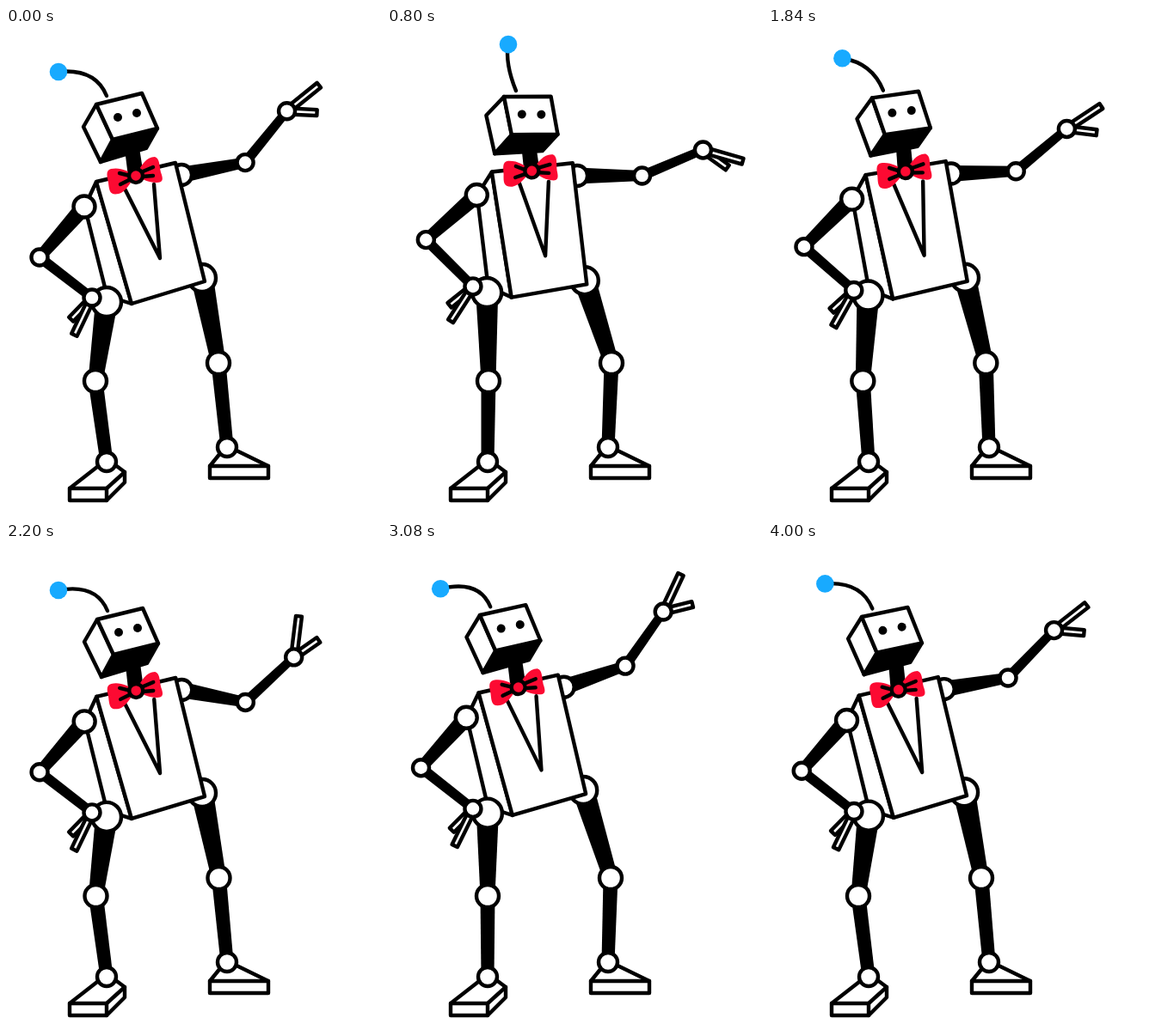
Animation of 436 by 567 pixels, one loop 4.04 s. Source, as an HTML page with a canvas:

```html
<!DOCTYPE html>
<html>
<head>
<meta charset="utf-8">
<title>Dancing robot</title>
<style>
html, body { margin: 0; width: 100%; height: 100%; overflow: hidden; background: #fff; }
canvas { display: block; }
</style>
</head>
<body>
<canvas id="stage" width="436" height="567"></canvas>
<script>
const ctx = document.getElementById('stage').getContext('2d');
const LOOP = 4040, BAR = 2020, STEP = 40;
const RED = '#fc0a32', BLUE = '#18aaff';
const rad = deg => deg * Math.PI / 180;

// time, lean, body y, head x, y, turn, antenna dx, dy, knee x, upper arm, forearm, hand, finger spread
const KEYS = [
  [0, 0, 308, 105, 89, 0, -56, -28, 104, -11, -51, -39, 42],
  [180, .1, 308, 106, 89, 0, -57, -24, 104.5, 11, -43, -83, 48],
  [380, -5.5, 311, 89, 98, -3, -57, -22, 97, -25, -55, -62, 50],
  [580, 3.6, 311, 113, 93, .5, -51, -18, 111, 3, -26, -46, 62],
  [800, 7.2, 306, 136, 80, 13.5, -9, -54, 118, 0, -23, 16, 20],
  [1060, .7, 304.5, 108, 84, 1.2, -58, -21, 117, -19, -55, -65, 51],
  [1480, 2.2, 304.5, 116, 82, 4.5, -54, -31, 113, 26, -56, -31, 33],
  [1810, 4, 305, 122, 81, 6, -47, -38, 111, 0, -40, -33, 40],
  [1980, .3, 307, 109, 86, 2, -55, -29, 105, -10, -46, -38, 43]
];

function key(i) {
  const n = KEYS.length, k = KEYS[(i + n) % n];
  return [k[0] + BAR * Math.floor(i / n), ...k.slice(1)];
}

// Smooth cubic through the keys, repeating every bar
function poseAt(t) {
  let i = KEYS.length - 1;
  while (KEYS[i][0] > t) i--;
  const [a, b, c, d] = [key(i - 1), key(i), key(i + 1), key(i + 2)];
  const span = c[0] - b[0], u = (t - b[0]) / span, v = 1 - u;
  return b.slice(1).map((p, j) => {
    const q = c[j + 1];
    const m = (q - a[j + 1]) / (c[0] - a[0]) * span;
    const n = (d[j + 1] - p) / (d[0] - b[0]) * span;
    return p * (1 + 2 * u) * v * v + m * u * v * v + q * u * u * (3 - 2 * u) - n * u * u * v;
  });
}

function poly(points, fill = '#fff') {
  ctx.beginPath();
  points.forEach(p => ctx.lineTo(...p));
  ctx.closePath();
  ctx.fillStyle = fill;
  ctx.fill();
  ctx.stroke();
}

function line(...points) {
  ctx.beginPath();
  points.forEach(p => ctx.lineTo(...p));
  ctx.stroke();
}

function disc([x, y], r, fill = '#fff', outline = true) {
  ctx.beginPath();
  ctx.arc(x, y, r, 0, 7);
  ctx.fillStyle = fill;
  ctx.fill();
  if (outline) ctx.stroke();
}

function limb([x1, y1], [x2, y2], w1, w2) {
  const a = Math.atan2(y2 - y1, x2 - x1), s = Math.sin(a) / 2, c = Math.cos(a) / 2;
  ctx.beginPath();
  ctx.moveTo(x1 - s * w1, y1 + c * w1);
  ctx.lineTo(x2 - s * w2, y2 + c * w2);
  ctx.lineTo(x2 + s * w2, y2 - c * w2);
  ctx.lineTo(x1 + s * w1, y1 - c * w1);
  ctx.fillStyle = '#000';
  ctx.fill();
}

function placed([x, y], deg, draw) {
  ctx.save();
  ctx.translate(x, y);
  ctx.rotate(rad(deg));
  draw();
  ctx.restore();
}

function hand(wrist, angle, spread) {
  const finger = (deg, end) => placed(wrist, deg, () =>
    poly([[4, -3.5], [end, -3.5], [end, 3.5], [4, 3.5]]));
  finger(angle + spread, 35);
  finger(angle, 48);
  disc(wrist, 9.5);
}

function leg(hip, knee, ankle, foot, hipSize) {
  limb(hip, knee, 26, 17);
  limb(knee, ankle, 17, 15);
  disc(hip, hipSize);
  foot();
  disc(knee, 13);
  disc(ankle, 11);
}

function leftFoot(lift) {
  const a = [74, 536 - 12 * lift], b = [117, 536 - 9 * lift], c = [138, 517 + 2 * lift];
  const d = [138, 529 + 2 * lift], e = [117, 550 - 13 * lift], f = [74, 550 - 14 * lift];
  poly([a, [106, 511], [126, 508], c, d, e, f]);
  line(a, b, c);
  line(b, e);
}

function rightFoot() {
  poly([[237, 510], [250, 494], [264, 490], [305, 510], [305, 524], [237, 524]]);
  line([237, 510], [305, 510]);
}

function torso() {
  poly([[-83.5, -129], [-97, -100], [-71, 4], [-42.5, 13]]);
  poly([[-83.5, -129], [8.5, -151], [42.5, -13], [-42.5, 13]]);
  line([-50, -120], [-9.5, -40], [-16.5, -126]);
}

function bowTie() {
  ctx.fillStyle = RED;
  ctx.fill(new Path2D('M0 0C-10-6-18-10-29-8C-36-6-33 2-32 8C-31 18-30 23-20 21C-12 19-8 10 0 0' +
    'C6-12 12-22 22-22C28-20 27-12 29-4C32 4 32 8 24 8C14 8 8 4 0 0'));
  line([-19, -3], [-7, 0]);
  line([-18, 10], [-6, 4]);
  line([6, -4], [20, -10]);
  line([7, 1], [20, 0]);
  disc([0, 0], 8, RED);
}

function head() {
  poly([[19, 41], [71, 28], [58, 51], [5, 67]], '#000');
  poly([[0, 0], [-15, 26], [5, 67], [19, 41]]);
  poly([[0, 0], [53, -13], [71, 28], [19, 41]]);
  disc([25, 15], 5, '#000', false);
  disc([47, 10], 5, '#000', false);
}

function draw(t) {
  const [lean, y, hx, hy, turn, ax, ay, kneeX, upper, fore, palm, spread] = poseAt(t);
  const turned = ([px, py], deg, [ox, oy]) => {
    const c = Math.cos(rad(deg)), s = Math.sin(rad(deg));
    return [ox + px * c - py * s, oy + px * s + py * c];
  };
  const center = [188.5, y];
  const onBody = (px, py) => turned([px, py], lean, center);
  const onHead = (px, py) => turned([px, py], turn, [hx, hy]);
  const lift = t > 340 && t < 780 ? Math.sin((t - 340) / 440 * Math.PI) : 0;

  ctx.fillStyle = '#fff';
  ctx.fillRect(0, 0, 436, 567);
  ctx.strokeStyle = '#000';
  ctx.lineWidth = 4.4;
  ctx.lineJoin = ctx.lineCap = 'round';

  leg(onBody(39.5, -17), [kneeX + 143, 390], [257, 488], rightFoot, 16);

  const shoulder = onBody(15.5, -137);
  const elbow = turned([75.5, 0], upper, shoulder);
  const wrist = turned([77, 0], fore, elbow);
  limb(shoulder, elbow, 19, 12);
  limb(elbow, wrist, 12, 10);
  disc(shoulder, 12);
  disc(elbow, 9.5);
  hand(wrist, palm, spread);

  placed(center, lean, torso);
  leg(onBody(-71.5, 11), [kneeX, 411], [117, 505], () => leftFoot(lift), 17);

  const arm = [onBody(-97.5, -100), onBody(-149.5, -41), onBody(-88.5, 6)];
  limb(arm[0], arm[1], 19, 13);
  limb(arm[1], arm[2], 12, 11);
  disc(arm[0], 12.5);
  disc(arm[1], 9.5);
  hand(arm[2], 115.5 + lean, 18.5);

  const bow = onBody(-37.5, -136);
  limb(onHead(41, 48), bow, 17, 18);
  const [bx, by] = onHead(12, -10);
  ctx.beginPath();
  ctx.moveTo(bx, by);
  ctx.quadraticCurveTo(bx - 13, by - 32, bx + ax, by + ay);
  ctx.stroke();
  disc([bx + ax, by + ay], 10.3, BLUE, false);
  placed([hx, hy], turn, head);
  placed(bow, lean, bowTie);
}

function tick() {
  const t = performance.now() % LOOP;
  draw(Math.floor(t / STEP) * STEP % BAR);
  requestAnimationFrame(tick);
}
tick();
</script>
</body>
</html>
```
